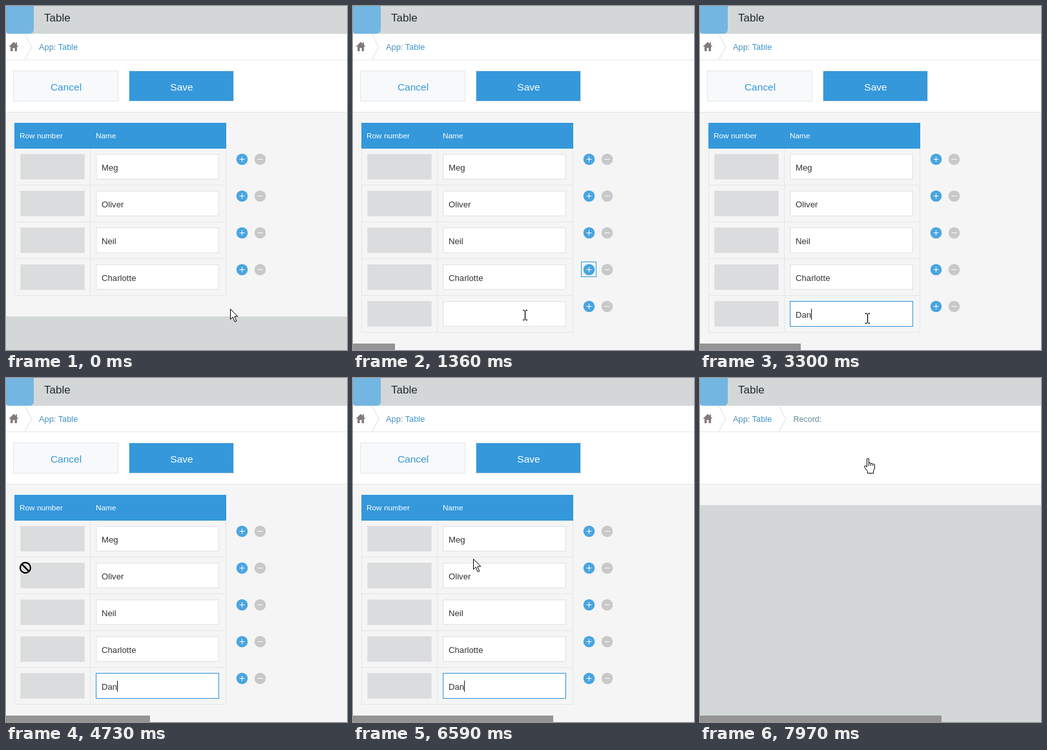
These frames come from a looping animation (528x533 px, 8000 ms). An HTML page:

```html
<!DOCTYPE html>
<html lang="en">
<head>
<meta charset="utf-8">
<title>Table form</title>
<style>
  html, body { margin: 0; width: 100%; height: 100%; overflow: hidden; background: #d3d7d7; }
  svg { display: block; width: 528px; height: 533px; cursor: default; }
  text { font-family: "Liberation Sans", Arial, sans-serif; white-space: pre; }
</style>
</head>
<body>
<svg id="stage" viewBox="0 0 528 533" xmlns="http://www.w3.org/2000/svg"></svg>
<script>
const LOOP = 8000;
const ROW_ADDED = 560, FIELD_CLICK = 2000, SAVE_CLICK = 7380, PAGE_CHANGE = 7880;
const KEY_TIMES = [2780, 2990, 3200];
const TYPED = "Dan";
const NAMES = ["Meg", "Oliver", "Neil", "Charlotte", ""];
const BLUE = "#3498db", LINE = "#e3e7e8", ROW_H = 57, TOP = 221;

// time, x, y of the pointer's hot spot
const PATH = [
  [0, 347, 469], [80, 347, 469], [420, 358, 412], [840, 358, 412],
  [1300, 266, 479], [1690, 266, 479], [1900, 259, 484], [4190, 259, 484],
  [4700, 30, 294], [4760, 30, 294], [5020, 58, 175], [5200, 66, 175],
  [5500, 72, 300], [5760, 54, 236], [5900, 54, 236], [6380, 186, 280],
  [6680, 186, 280], [7160, 260, 125], [LOOP, 260, 125]
];

const stage = document.getElementById("stage");

function el(parent, tag, attrs, content) {
  const node = document.createElementNS(stage.namespaceURI, tag);
  for (const key in attrs) node.setAttribute(key, attrs[key]);
  if (content !== undefined) node.textContent = content;
  parent.appendChild(node);
  return node;
}
const group = parent => el(parent, "g", {});
const rect = (parent, x, y, width, height, fill, extra) =>
  el(parent, "rect", { x, y, width, height, fill, ...extra });
const box = (parent, x, y, w, h, fill, stroke) =>
  rect(parent, x + .5, y + .5, w - 1, h - 1, fill, { stroke });
const path = (parent, d, extra) => el(parent, "path", { d, fill: "none", ...extra });
const label = (parent, x, y, size, fill, content, extra) =>
  el(parent, "text", { x, y, "font-size": size, fill, ...extra }, content);
const show = (node, on) => node.setAttribute("visibility", on ? "visible" : "hidden");

function chevron(parent, x) {
  path(parent, `M${x} 43L${x + 11} 63.5L${x} 83`, { stroke: LINE, "stroke-width": 1.3 });
}

function roundButton(parent, x, y, fill, glyph) {
  el(parent, "circle", { cx: x, cy: y, r: 8.8, fill });
  path(parent, `M${x - 4} ${y}h8${glyph === "+" ? `M${x} ${y - 4}v8` : ""}`, { stroke: "#fff" });
}

function tableRow(parent, index, name) {
  const y = TOP + index * ROW_H, g = group(parent);
  box(g, 13, y - 1, 118, ROW_H + 1, "none", LINE);
  box(g, 130, y - 1, 211, ROW_H + 1, "none", LINE);
  box(g, 22, y + 8, 100, 40, "#dbdcdd", "#e2e4e5");
  box(g, 139, y + 8, 191, 40, "#fff", LINE);
  box(g, 140, y + 9, 189, 38, "none", "#f3f4f5");
  roundButton(g, 365.5, y + 16.5, "#4aa5df", "+");
  roundButton(g, 393.5, y + 16.5, "#c8c8c8", "-");
  return { g, text: label(g, 148, y + 34, 13.2, "#333", name) };
}

// Page frame
rect(stage, 0, 0, 528, 533, "#d3d7d7");
rect(stage, 0, 43, 528, 122, "#fff");
rect(stage, 0, 83, 528, 1, LINE);
const panel = rect(stage, 0, 165, 528, 316, "#f5f5f5");
rect(stage, 0, 164, 528, 1, "#e3e5e5");
path(stage, "M0 0H43V36Q43 43 36 43H5Q1 43 0 39Z", { fill: "#74b6e2" });
label(stage, 59, 24, 17, "#222b32", "Table");
path(stage, "M12 55.5L4.5 63H7V70H10.5V65H13.5V70H17V63H19.5L17 60.5V56.5H15V58.5Z", { fill: "#827a7c" });
chevron(stage, 29);
const crumb = label(stage, 51, 68, 12.8, "#4a90b8", "App: ");
el(crumb, "tspan", { fill: "#3c96cc" }, "Table");

const recordCrumb = group(stage);
chevron(recordCrumb, 122);
label(recordCrumb, 144.5, 68, 12.5, "#668a9b", "Record:");

// Form
const form = group(stage);
box(form, 11, 100, 163, 48, "#f7f9fa", LINE);
label(form, 93, 131, 15.5, BLUE, "Cancel", { "text-anchor": "middle" });
const save = box(form, 190, 100, 163, 48, BLUE, LINE);
label(form, 272, 131, 15.5, "#fff", "Save", { "text-anchor": "middle" });
const rows = NAMES.map((name, i) => tableRow(form, i, name));
rect(form, 13, 181, 328, 40, BLUE);
label(form, 21, 205, 11.8, "#fff", "Row number");
label(form, 139, 205, 11.8, "#fff", "Name");
const addFocus = box(form, 353, 396, 24, 24, "none", BLUE);
const fieldFocus = box(rows[4].g, 139, 457, 191, 40, "none", BLUE);
const caret = rect(rows[4].g, 148, 469, 1, 17, "#111");
const typed = rows[4].text;

const progress = rect(stage, 0, 523, 0, 10, "#949494");

// Pointers, drawn around their hot spots
const outline = { stroke: "#000", fill: "#fff", "stroke-width": 1, "stroke-linejoin": "round" };
const pointers = { arrow: group(stage), hand: group(stage), beam: group(stage), blocked: group(stage) };
path(pointers.arrow, "M.5 .5V16.5L4.2 13L7.2 20.3L9.8 19.2L6.8 12H11.8Z", outline);
path(pointers.hand, "M-1.5 13V1Q-1.5 -.5 0 -.5T1.5 1V7Q3 5.5 4.5 7.5Q6 6.3 7.5 8.3Q10.5 7.5 10.5 10V15L8.5 19V22.5H-.5V19.5L-5.5 13Q-6 10.5 -3.5 11Z", outline);
path(pointers.hand, "M1.5 7V11M4.5 8V11M7.5 9V11", { stroke: "#000" });
path(pointers.beam, "M-3 -7.5H-.5M1.5 -7.5H4M.5 -7V7M-3 7.5H-.5M1.5 7.5H4", { stroke: "#000", "stroke-width": 1.3 });
el(pointers.blocked, "circle", { r: 8, fill: "none", stroke: "#fff", "stroke-width": 4.5 });
el(pointers.blocked, "circle", { r: 8, fill: "none", stroke: "#000", "stroke-width": 2.4 });
path(pointers.blocked, "M-5.6 -5.6L5.6 5.6", { stroke: "#000", "stroke-width": 2.4 });

function pointerAt(t) {
  const i = Math.max(1, PATH.findIndex(step => step[0] > t));
  const [t0, x0, y0] = PATH[i - 1], [t1, x1, y1] = PATH[i];
  const u = (t - t0) / (t1 - t0), k = u * u * (3 - 2 * u);
  return [Math.round(x0 + (x1 - x0) * k), Math.round(y0 + (y1 - y0) * k)];
}

const overSave = (x, y) => x > 190 && x < 353 && y > 100 && y < 148;

function pointerKind(t, x, y) {
  if (t >= PAGE_CHANGE) return "hand";
  if (t >= SAVE_CLICK) return "arrow";
  if (overSave(x, y)) return "hand";
  const count = t < ROW_ADDED ? 4 : 5;
  const row = Math.floor((y - TOP) / ROW_H), dy = y - TOP - row * ROW_H;
  if (row < 0 || row >= count) return "arrow";
  if (Math.hypot(x - 365.5, dy - 16.5) < 9.5) return "hand";
  if (dy < 8 || dy > 48) return "arrow";
  if (x >= 22 && x < 122) return "blocked";
  return x >= 139 && x < 330 ? "beam" : "arrow";
}

function render(t) {
  const onForm = t < PAGE_CHANGE, added = t >= ROW_ADDED;
  const focused = t >= FIELD_CLICK && t < SAVE_CLICK;
  show(recordCrumb, !onForm);
  form.style.display = onForm ? "" : "none";
  rows[4].g.style.display = added ? "" : "none";
  panel.setAttribute("height", onForm ? (added ? 368 : 316) : 32);
  show(addFocus, added && t < FIELD_CLICK);
  show(fieldFocus, focused);

  const letters = KEY_TIMES.filter(k => k <= t).length;
  typed.textContent = TYPED.slice(0, letters);
  const since = t - (letters ? KEY_TIMES[letters - 1] : FIELD_CLICK);
  show(caret, focused && since % 1060 < 530);
  caret.setAttribute("x", Math.round(148 + (letters ? typed.getComputedTextLength() : 0)));

  progress.setAttribute("width", t < 30 ? 0 : Math.round(1.4 + t * .04675));

  const [x, y] = pointerAt(t), kind = pointerKind(t, x, y);
  save.setAttribute("fill", overSave(x, y) ? "#1d6fa5" : BLUE);
  for (const name in pointers) {
    show(pointers[name], name === kind);
    pointers[name].setAttribute("transform", `translate(${x} ${y})`);
  }
}

const start = performance.now();
function tick() {
  render((performance.now() - start) % LOOP);
  requestAnimationFrame(tick);
}
tick();
</script>
</body>
</html>
```
